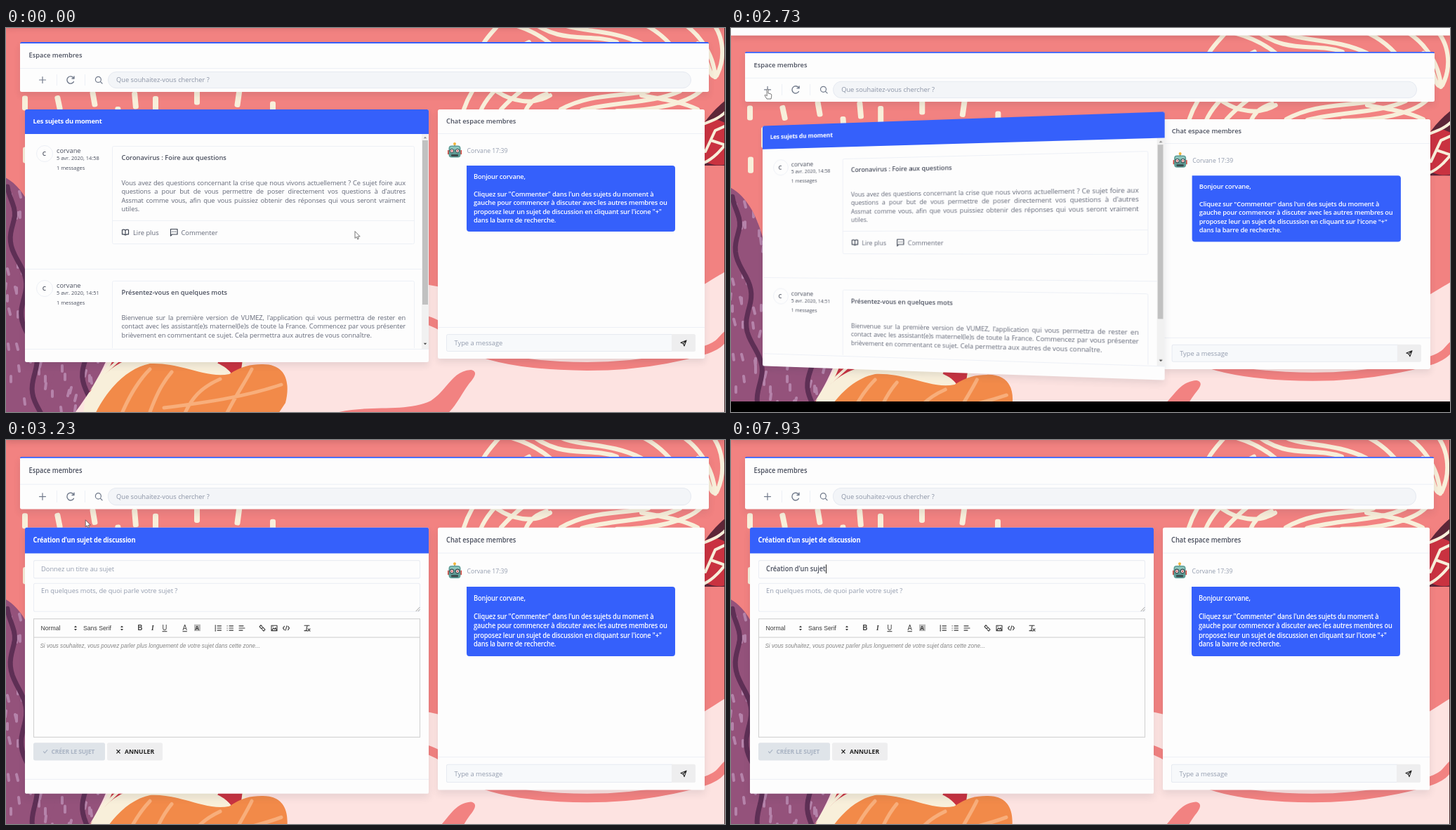
These frames come from a looping animation (1024 by 547 pixels, 8 s). An HTML page:

```html
<!DOCTYPE html>
<html lang="fr">
<head>
<meta charset="utf-8">
<title>Espace membres</title>
<style>
html, body { margin: 0; width: 100%; height: 100%; overflow: hidden; background: #f28281; }
#stage { position: relative; width: 1024px; height: 547px; overflow: hidden; font: 9.3px "Open Sans", sans-serif; }
#stage div, #stage svg { position: absolute; box-sizing: border-box; }
#page { left: 0; top: 0; width: 1024px; height: 547px; transform-origin: 0 0; }
svg { overflow: visible; left: 0; top: 0; }
.t { white-space: nowrap; line-height: 20px; }
.card { background: #fdfdfd; border-radius: 2.5px; box-shadow: 0 5px 10px rgba(44, 51, 73, .1); }
.flip { left: 26.5px; top: 116px; width: 575.5px; height: 360px; }
.bar { left: 0; top: 0; width: 100%; height: 34.5px; background: #3560fb; border-radius: 2.5px 2.5px 0 0; }
#stage .line { text-align: justify; text-align-last: justify; white-space: normal; letter-spacing: -.1px; }
#caret { display: inline-block; width: 1px; height: 12px; background: #222; vertical-align: -2.5px; }
</style>
</head>
<body>
<div id="stage">
  <div id="page"></div>
  <div id="edge" style="left:1022.5px;top:0;width:2px;height:547px;background:#4a3032"></div>
  <div id="floor" style="left:0;top:532px;width:1024px;height:15px;background:#000"></div>
  <svg id="pointer" width="20" height="20"></svg>
</div>
<script>
const $ = id => document.getElementById(id);
const DARK = '#4a4f5e', BODY = '#636878', HINT = '#939cae', RULE = '#edf0f6';

// ---------- builders ----------
const box = (x, y, w, h, css = '', inner = '', cls = '') =>
  `<div class="${cls}" style="left:${x}px;top:${y}px;width:${w}px;height:${h}px;${css}">${inner}</div>`;
const txt = (x, cy, s, color = BODY, size = 9.3, weight = 400, css = '') =>
  `<div class="t" style="left:${x}px;top:${cy - 10}px;color:${color};font-size:${size}px;font-weight:${weight};${css}">${s}</div>`;
const rule = (x, y, w) => box(x, y, w, 1, `background:${RULE}`);
const path = (d, fill, stroke = 'none', w = 1, extra = '') =>
  `<path d="${d}" fill="${fill}" stroke="${stroke}" stroke-width="${w}" stroke-linecap="round" stroke-linejoin="round" ${extra}/>`;
const stroke = (d, color, w, extra) => path(d, 'none', color, w, extra);
const svg = (x, y, inner) => `<svg width="1" height="1" style="left:${x}px;top:${y}px">${inner}</svg>`;
const icon = (x, y, d, color = '#6d7687', w = 1.2) => svg(x, y, stroke(d, color, w));

let seed = 11;
const rnd = () => (seed = (seed * 16807) % 2147483647) / 2147483647;

// ---------- background ----------
function backdrop() {
  const cream = '#f8efda', pale = '#fde3e1', coral = '#f28281', purple = '#94527b', plum = '#5e2f55',
        red = '#c93240', orange = '#f28a49';
  let s = `<rect x="-5" y="-20" width="1034" height="600" fill="${coral}"/>`;
  s += path('M0 312C80 312 150 335 220 370S360 415 400 413C470 405 500 378 570 377C640 377 700 420 800 430S960 400 1026 360V580H0Z', pale);
  s += stroke('M50 334C95 340 130 350 170 385', coral, 9);
  s += stroke('M380 472C450 458 500 424 560 424C610 425 630 445 660 470C720 498 850 503 940 486S1010 462 1032 447', coral, 12);
  s += path('M470 562C520 550 570 562 605 545C630 528 635 503 662 501C673 503 667 512 660 520C648 536 642 552 626 566Z', coral);

  // falling cream dashes
  const dashes = [27,121,0, 75,121,-12, 125,115,-10, 160,138,-4, 184,117,-5, 213,124,0, 272,110,0, 331,113,8,
    380,133,0, 47,156,0, 255,147,0, 88,168,-4, 28,195,0, 110,186,3, 145,184,4, 190,182,-6, 173,215,4,
    236,205,-3, 60,229,-6, 212,241,0, 203,279,2, 237,279,0, 431,239,-8, 450,280,-2];
  for (let i = 0; i < dashes.length; i += 3) {
    const [x, y, a] = dashes.slice(i, i + 3), h = 21 + (i * 7) % 10;
    s += `<rect x="${x - 4}" y="${y - h / 2}" width="8" height="${h}" rx="3" fill="${cream}" transform="rotate(${a} ${x} ${y})"/>`;
  }

  // red leaf with cream veins
  const leaf = 'M110 535C160 500 155 455 178 400C200 362 250 343 292 347C350 380 350 450 330 540Z';
  s += `<clipPath id="redleaf"><path d="${leaf}"/></clipPath>` + path(leaf, red, cream, 5);
  s += `<g clip-path="url(#redleaf)">`;
  for (let i = 0; i < 6; i++)
    s += path(`M${188 + i * 17} ${405 - i * 4 + (i % 2) * 35}q5 -10 16 -16q-4 13 -16 16Z`, plum);
  s += stroke('M135 510C180 470 235 420 300 345M160 455L205 443L192 380M215 435L255 425L300 440M215 435L232 355M250 400L246 350M175 475L230 472L300 490M255 425L290 470', cream, 4) + '</g>';

  // orange leaf
  s += path('M112 545C140 494 180 474 235 478C280 482 308 490 320 505L330 565H110Z', cream);
  s += path('M122 575C135 542 165 500 205 492C250 490 285 514 318 507C335 496 348 493 364 493C400 492 405 520 398 548L380 575Z', orange);
  s += stroke('M160 575C172 545 185 520 205 500M200 575C212 540 222 520 236 504M250 575C262 540 280 525 305 514M310 572C325 540 340 520 350 500M225 555C280 548 340 540 392 522', '#f8ae7b', 5);

  // purple leaves
  const shapes = ['M-5 225C30 240 48 290 55 350C60 430 78 500 98 570H-5Z',
    'M95 213C150 250 172 330 167 390C162 450 146 500 92 570H50C64 520 84 460 96 370C104 300 88 250 91 217C92 213 94 212 95 213Z'];
  s += `<clipPath id="purple"><path d="${shapes.join('')}"/></clipPath>` + shapes.map(d => path(d, purple)).join('');
  let ticks = '';
  for (let i = 0; i < 110; i++) ticks += `M${rnd() * 165 | 0} ${235 + rnd() * 320 | 0}l${rnd() * 6 - 3 | 0} 8`;
  s += `<g clip-path="url(#purple)">${stroke(ticks, '#b583aa', 4)}`;
  const vein = (x0, y0, dx) => {
    let d = '';
    for (let y = 0; y < 345; y += 6)
      d += `${y ? 'L' : 'M'}${(x0 + dx * y / 345 + Math.sin(y / 17) * Math.min(7, y / 6)).toFixed(1)} ${y0 + y}`;
    return stroke(d, plum, 7);
  };
  s += vein(2, 240, 50) + vein(97, 217, 22) + '</g>';

  // line flower, top right
  s += stroke('M703 8C694 18 686 26 680 36M718 8C740 14 760 24 775 36M652 130C662 100 690 60 745 34M676 132C690 100 730 70 790 38M705 130C725 108 745 95 765 82M740 132C745 120 756 112 770 108M700 105C720 118 750 125 775 110M742 0C790 40 830 20 870 34M770 -5C800 25 850 10 905 36M870 -5C910 5 930 20 945 36M950 0C985 15 1008 50 1010 84M1000 0C1022 20 1026 55 1012 82C1000 88 1003 60 985 36M790 130C830 108 870 112 915 104M820 131C870 118 920 122 960 104M870 132C920 132 970 122 990 103M905 110C940 116 965 120 985 130', cream, 6);
  s += path('M990 155C1000 140 1012 127 1026 116V210H990Z', '#5d2638') + path('M990 150C1008 140 1018 146 1026 150V208C1010 212 1000 206 990 203Z', red);
  s += stroke('M990 152C1006 146 1018 142 1028 130M996 190L1010 160L1028 152M994 206C1008 200 1018 188 1028 176M1004 174L1022 180', cream, 4);
  return `<svg width="1024" height="570" style="top:-13.7px">${s}</svg>`;
}

// ---------- header ----------
function header() {
  return box(20, 20, 980.5, 71, 'border-top:2.5px solid #3560fb', '', 'card') +
    txt(32.5, 39, 'Espace membres', DARK, 9.3, 600) + rule(20, 56.5, 980) +
    icon(52, 74, 'M-4.5 0H4.5M0 -4.5V4.5', '#727b8c') +
    icon(92, 74, 'M4.4 2.6A5.1 5.1 0 1 1 3.9 -3.3M5 -5V-2H2', '#727b8c', 1.4) +
    icon(132, 74, 'M2.7 2.7L5 5M3.4 -.6A4 4 0 1 1 -4.6 -.6A4 4 0 1 1 3.4 -.6', '#727b8c') +
    box(72, 66, 1, 16, `background:${RULE}`) + box(111.5, 66, 1, 16, `background:${RULE}`) +
    box(145, 62, 831, 24, 'background:#f3f5f8;border:1px solid #e6eaf1;border-radius:12px') +
    txt(157, 74, 'Que souhaitez-vous chercher ?', '#8a93a5');
}

// ---------- topic list (page coordinates, shifted into the panel) ----------
const shift = inner => `<div style="left:-26.5px;top:-116px;width:1024px;height:547px">${inner}</div>`;

function topic(y, time, title, lines) {
  const last = lines.length - 1;
  return box(43, y + 11, 24, 24, `border:1px solid ${RULE};border-radius:50%`) +
    txt(51.8, y + 23, 'C', DARK, 8.4, 600) + txt(72, y + 18.5, 'corvane', DARK) +
    txt(72, y + 29, `5 avr. 2020, ${time}`, DARK, 7.44) + txt(72, y + 42.5, '1 messages', DARK, 7.44) +
    box(151, y + 11.5, 430.5, 140.5, `border:1px solid ${RULE};border-radius:2.5px`) +
    txt(164.5, y + 29, title, DARK, 9.3, 600) +
    lines.map((l, i) => `<div class="t ${i < last ? 'line' : ''}" style="left:164.5px;top:${y + 55 + i * 12.4}px;width:404.5px;color:${BODY}">${l}</div>`).join('');
}

function topics() {
  const list = topic(156, '14:58', 'Coronavirus : Foire aux questions', [
      'Vous avez des questions concernant la crise que nous vivons actuellement ? Ce sujet foire aux',
      'questions a pour but de vous permettre de poser directement vos questions à d\'autres',
      'Assmat comme vous, afin que vous puissiez obtenir des réponses qui vous seront vraiment',
      'utiles.']) +
    rule(151, 274, 430) +
    icon(170, 291, 'M0 -3V4M0 -3C-1.5 -4 -3 -4 -4.5 -3.5V3C-3 2.5 -1.5 3 0 4C1.5 3 3 2.5 4.5 3V-3.5C3 -4 1.5 -4 0 -3', '#3f4654') +
    txt(181, 291.5, 'Lire plus') +
    icon(238.5, 291, 'M-4.5 5V-4.5H5V3H-2.5ZM-2 -.8h.1M.2 -.8h.1M2.4 -.8h.1', '#3f4654') +
    txt(249.5, 291.5, 'Commenter') + rule(27, 343, 565) +
    topic(348, '14:51', 'Présentez-vous en quelques mots', [
      'Bienvenue sur la première version de VUMEZ, l\'application qui vous permettra de rester en',
      'contact avec les assistant(e)s maternel(le)s de toute la France. Commencez par vous présenter',
      'brièvement en commentant ce sujet. Cela permettra aux autres de vous connaître.']);
  const scroll = box(592, 151, 10, 306, 'background:#f1f1f1') + box(593.3, 160, 7.5, 234, 'background:#c1c1c1') +
    svg(597, 155.5, path('M-2.2 1.2L0 -1.2L2.2 1.2Z', '#8a8a8a')) + svg(597, 450, path('M-2.2 -1.2L0 1.2L2.2 -1.2Z', '#444'));
  return '<div class="bar"></div>' + shift(txt(38.5, 133, 'Les sujets du moment', '#fff', 9.3, 700, 'letter-spacing:-.2px') +
    box(0, 0, 1024, 456, 'overflow:hidden', list) + scroll + rule(27, 456.5, 575));
}

// ---------- topic form ----------
function form() {
  const field = (y, h) => box(38.5, y, 551, h, 'background:#fdfdfd;border:1px solid #eaedf3;border-radius:2.5px');
  const arial = "font-family:'Liberation Sans',Arial,sans-serif";
  const tool = (x, s, css = '') => txt(x, 251.5, s, '#3a3a3a', 9.5, 700, arial + ';' + css);
  const ico = (x, d) => icon(x, 251.5, d, '#3a3a3a', 1.1);
  const updown = x => svg(x, 251.5, path('M-2 -1L0 -3.3L2 -1ZM-2 1L0 3.3L2 1Z', '#3a3a3a'));
  return '<div class="bar"></div>' + shift(
    txt(38.5, 133, 'Création d\'un sujet de discussion', '#fff', 9.3, 700, 'letter-spacing:-.2px') +
    field(160, 25) + `<div id="entry" class="t" style="left:50px;top:162.3px"></div>` +
    field(191, 39) + txt(50, 202, 'En quelques mots, de quoi parle votre sujet ?', HINT) +
    icon(586.5, 227, 'M-3 2L2 -3M0 2L2 0', '#888', .8) +
    box(38.5, 238.5, 551, 161, 'border:1px solid #cfcfcf') + box(38.5, 264, 551, 1, 'background:#cfcfcf') +
    txt(49.5, 251.5, 'Normal', '#3a3a3a', 8.68, 400, arial) + updown(98.5) +
    txt(110, 251.5, 'Sans Serif', '#3a3a3a', 8.68, 400, arial) + updown(165) +
    tool(187.5, 'B') + tool(207, 'I', "font-family:'Liberation Serif',serif;font-style:italic") +
    tool(222.5, 'U', 'font-weight:400;text-decoration:underline') +
    tool(251.5, 'A', 'font-weight:400;text-decoration:underline') +
    box(267.5, 247, 9, 9, 'background:#bbb') + tool(269, 'A', 'font-size:8.5px') +
    ico(302, 'M-1 -3H4.5M-1 0H4.5M-1 3H4.5M-3.8 -4V-2M-3.8 -1V1M-3.8 2V4') +
    ico(319, 'M-1 -3H4.5M-1 0H4.5M-1 3H4.5M-4 -3h.2M-4 0h.2M-4 3h.2') +
    ico(336, 'M-4 -3H2M-4 0H4M-4 3H1') +
    ico(365, 'M-1 1L1 -1M0 -2L-2 -4L-4 -2L-1.5 .5M0 2L2 4L4 2L1.5 -.5') +
    ico(382, 'M-4 -3.5H4V3.5H-4ZM-3 2.5L-1 0L.5 1.5L2 -.5L3 2.5M-2 -2h.2') +
    ico(399, 'M-2.5 -2.5L-4.5 0L-2.5 2.5M2.5 -2.5L4.5 0L2.5 2.5M.8 -3L-.8 3') +
    ico(429, 'M-4 -3.5H3M0 -3.5L-1.5 3.5M1 1L4 4M4 1L1 4M-4 3.5H0') +
    txt(48.5, 277.2, 'Si vous souhaitez, vous pouvez parler plus longuement de votre sujet dans cette zone...', '#858585', 8.06, 400, arial + ';font-style:italic') +
    box(38.5, 406.5, 102.5, 24, 'background:#dfe4e9;border-radius:2.5px') + icon(55.5, 418.5, 'M-2.5 0L-.8 2L2.8 -2', '#aab4c4') +
    txt(64.5, 418.5, 'CRÉER LE SUJET', '#aab4c4', 8.68, 700, 'letter-spacing:-.25px') +
    box(143.5, 406.5, 79.5, 24, 'background:#eeeeef;border-radius:2.5px') + icon(159.5, 418.5, 'M-2.2 -2.2L2.2 2.2M-2.2 2.2L2.2 -2.2', '#222') +
    txt(169, 418.5, 'ANNULER', '#222', 8.68, 700) + rule(27, 456, 575));
}

// ---------- chat ----------
function chat() {
  const robot = path('M-10 -1h20v6h-20Z', '#d9473f') + path('M0 -7V-10', 'none', '#8f8f8f', 1.5) +
    '<circle cy="-10" r="2" fill="#f2b53a"/><rect x="-8.5" y="-7.5" width="17" height="17" rx="4" fill="#5d9c95"/>' +
    '<rect x="-7" y="-6" width="14" height="4" rx="2" fill="#8cc6bd"/>' +
    '<g fill="#fff" stroke="#3a3f45" stroke-width="1"><circle cx="-4" r="2.6"/><circle cx="4" r="2.6"/></g>' +
    '<g fill="#c33"><circle cx="-4" r="1"/><circle cx="4" r="1"/></g><rect x="-5" y="5" width="10" height="3" rx="1" fill="#3b4a4c"/>';
  const lines = ['Bonjour corvane,', '', 'Cliquez sur "Commenter" dans l\'un des sujets du moment à',
    'gauche pour commencer à discuter avec les autres membres ou',
    'proposez leur un sujet de discussion en cliquant sur l\'icone "+"', 'dans la barre de recherche.'];
  return box(614.5, 116, 380, 354.5, '', '', 'card') + txt(627, 133, 'Chat espace membres', DARK, 9.3, 600) +
    rule(614.5, 150, 380) + svg(639, 174.5, robot) + txt(656.5, 175, 'Corvane 17:39', HINT, 8.68) +
    box(656, 195.5, 296.5, 94, 'background:#3560fb;border-radius:0 4px 4px 4px') +
    lines.map((l, i) => txt(666, 212 + i * 12.4, l, '#fff', 9.3, 600, 'letter-spacing:-.18px')).join('') +
    rule(614.5, 426, 380) +
    box(627, 436, 321.5, 25, 'background:#f7f9fb;border:1px solid #e6eaf1;border-radius:2.5px 0 0 2.5px') +
    txt(638.5, 448.5, 'Type a message', HINT) +
    box(948, 436, 34, 25, 'background:#eeeeef;border-radius:0 2.5px 2.5px 0') +
    icon(965, 448.5, 'M4 -4L-4 -.8L-.6 .6L1 4ZL-.6 .6', '#222', 1.1);
}

$('page').innerHTML = backdrop() +
  box(0, -30, 1024, 27.3, 'background:#fdfdfd;box-shadow:0 3px 8px rgba(60,30,40,.18)') +
  header() + chat() +
  `<div id="front" class="card flip">${topics()}</div><div id="back" class="card flip">${form()}</div>`;

// ---------- motion ----------
const LOOP = 8000, TEXT = 'Création d\'un sujet', FOCUS = 3970;
const KEYS = [4600, 4900, 5330, 5600, 5730, 5830, 6000, 6070, 6170, 6230, 6470, 6570, 6730, 7170, 7370, 7470, 7630, 7730, 7930];
const TRACK = [[100, 497, 290], [670, 217, 127], [900, 58, 91], [1200, 52, 88], [2900, 52, 88],
  [3230, 113, 114], [3430, 160, 150], [3530, 160, 150], [3830, 197, 183]];
const CURSORS = {
  arrow: path('M0 0V9.5L2.2 7.5L3.8 11L5.3 10.3L3.8 7H6.8Z', '#fff', '#555', .8),
  hand: path('M-1 0C-1 -1.2 1 -1.2 1 0V5L5 6C6 6.5 6 9 5 13H-1L-4 8C-4 7 -2.5 7 -1 8.5Z', '#fff', '#555', .8),
  beam: stroke('M-2 -5H2M0 -5V5M-2 5H2', '#333', 1)
};

// cubic-bezier(.25, .1, .25, 1)
function ease(x) {
  if (x <= 0) return 0;
  if (x >= 1) return 1;
  const curve = (a, b, u) => 3 * a * u * (1 - u) ** 2 + 3 * b * u * u * (1 - u) + u ** 3;
  let lo = 0, hi = 1;
  for (let i = 0; i < 24; i++) {
    const mid = (lo + hi) / 2;
    curve(.25, .25, mid) < x ? lo = mid : hi = mid;
  }
  return curve(.1, 1, lo);
}

function along(t) {
  const i = TRACK.findIndex(k => k[0] > t);
  if (i < 1) return (i ? TRACK[TRACK.length - 1] : TRACK[0]).slice(1);
  const [a, b] = [TRACK[i - 1], TRACK[i]], u = (t - a[0]) / (b[0] - a[0]);
  return [a[1] + (b[1] - a[1]) * u, a[2] + (b[2] - a[2]) * u];
}

let shape = '', typed = '';
function draw(t) {
  const windowed = t >= 100 && t < 3100;
  $('page').style.transform = windowed ? 'matrix(1.001,0,0,1.0025,0,13.7)'
    : t < 100 ? 'none' : 'matrix(1,0,0,1.053,0,2.6)';
  $('floor').style.display = windowed ? '' : 'none';
  $('edge').style.display = windowed ? 'none' : '';

  const angle = -180 * ease((t - 2700) / 500), front = angle > -90;
  const turn = a => a ? `perspective(725px) rotateY(${a}deg)` : 'none';
  $('front').style.display = front ? '' : 'none';
  $('back').style.display = front ? 'none' : '';
  $('front').style.transform = turn(angle);
  $('back').style.transform = turn(angle + 180);

  const n = KEYS.filter(k => k <= t).length;
  const caret = t >= FOCUS && !(t >= 4400 && t < 4600) ? '<span id="caret"></span>' : '';
  const entry = n ? `<span style="color:${DARK};font-weight:600">${TEXT.slice(0, n).replace(/ $/, '&nbsp;')}</span>${caret}`
    : `<span style="position:absolute;left:0">${caret}</span><span style="color:${HINT}">Donnez un titre au sujet</span>`;
  if (entry !== typed) $('entry').innerHTML = typed = entry;

  const [x, y] = along(t);
  const kind = t >= 880 && t < 2960 ? 'hand' : t >= 3750 ? 'beam' : 'arrow';
  if (kind !== shape) $('pointer').innerHTML = CURSORS[shape = kind];
  $('pointer').style.transform = `translate(${x}px,${y}px)`;
  $('pointer').style.display = t < 4400 ? '' : 'none';
}

const start = performance.now();
function tick() {
  draw((performance.now() - start) % LOOP);
  requestAnimationFrame(tick);
}
tick();
</script>
</body>
</html>
```
